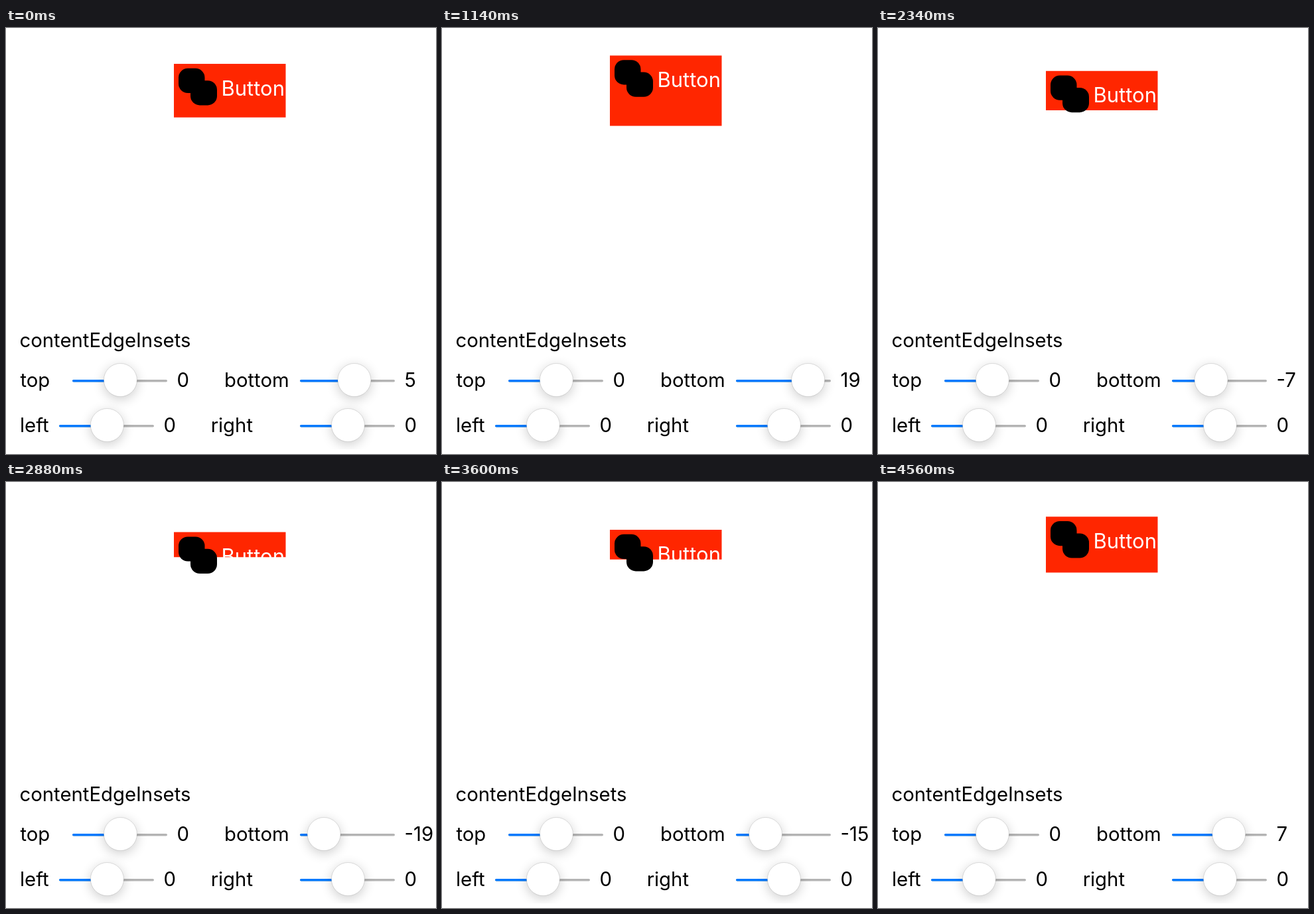
Recreate the animation shown at these times as an HTML page with a canvas. Size 648 by 642 pixels, loop 4.62 s.

```html
<!DOCTYPE html>
<html lang="en">
<head>
<meta charset="utf-8">
<title>contentEdgeInsets</title>
<style>
  html, body { margin: 0; width: 100%; height: 100%; overflow: hidden; background: #fff; }
  canvas { display: block; }
</style>
</head>
<body>
<canvas id="stage" width="648" height="642"></canvas>
<script>
const ctx = document.getElementById('stage').getContext('2d');
const LOOP = 4620, STEP = 60;

// [time in ms, slider value]
const drag = [
  [0, 5], [540, 17.3], [885, 25], [1140, 19], [1680, 7], [2340, -7],
  [2880, -19], [3165, -25], [3600, -14.6], [3780, -11.5], [4320, 0.8], [4560, 7]
];

function valueAt(time) {
  const next = Math.max(1, drag.findIndex(([t]) => t >= time));
  const [t0, v0] = drag[next - 1], [t1, v1] = drag[next];
  return v0 + (v1 - v0) * (time - t0) / (t1 - t0);
}

function text(str, x, y, color = '#000', size = 29.3) {
  ctx.font = `${size}px Inter, sans-serif`;
  ctx.fillStyle = color;
  ctx.fillText(str, x, y);
}

function box(x, y, w, h, r, color) {
  ctx.fillStyle = color;
  ctx.beginPath();
  ctx.roundRect(x, y, w, h, r);
  ctx.fill();
}

function circle(x, y, r) {
  ctx.beginPath();
  ctx.arc(x, y, r, 0, Math.PI * 2);
}

function slider(x, y, value) {
  const knob = x + 72.4 + value * 1.91, knobY = y - 1.5;
  box(x, y - 2, 143, 3.6, 1.8, '#b4b4b4');
  box(x, y - 2, knob - x, 3.6, 1.8, '#007aff');
  ctx.save();
  ctx.shadowColor = 'rgba(0,0,0,0.2)';
  ctx.shadowBlur = 17;
  ctx.shadowOffsetY = 4;
  ctx.fillStyle = '#fff';
  circle(knob, knobY, 25);
  ctx.fill();
  ctx.restore();
  ctx.strokeStyle = 'rgba(0,0,0,0.12)';
  ctx.lineWidth = 1;
  circle(knob, knobY, 25);
  ctx.stroke();
}

function control(label, labelX, trackX, y, value) {
  text(label, labelX, y + 9);
  slider(trackX, y, value);
  text(String(Math.round(value)), trackX + 157.5, y + 9);
}

function button(bottomInset) {
  const top = 58.5 - bottomInset * 0.9;
  box(253, top, 168.5, 71.8 + bottomInset * 1.8, 0, '#ff2600');
  box(260, top + 6.8, 39.5, 37.2, 14, '#000');
  box(278, top + 25.2, 40, 37.2, 14, '#000');
  text('Button', 324.5, top + 47.5, '#fff', 31);
}

function draw(now) {
  const time = Math.floor((now % LOOP) / STEP) * STEP;
  const bottom = valueAt(time);
  ctx.fillStyle = '#fff';
  ctx.fillRect(0, 0, 648, 642);
  button(Math.round(bottom));
  text('contentEdgeInsets', 20.5, 481);
  control('top', 21.5, 100, 532, 0);
  control('bottom', 329, 443, 532, bottom);
  control('left', 21, 80, 600, 0);
  control('right', 308.7, 443, 600, 0);
  box(0, 635, 648, 7, 0, '#fff');
}

const start = performance.now();
function tick() {
  draw(performance.now() - start);
  requestAnimationFrame(tick);
}
tick();
</script>
</body>
</html>
```
